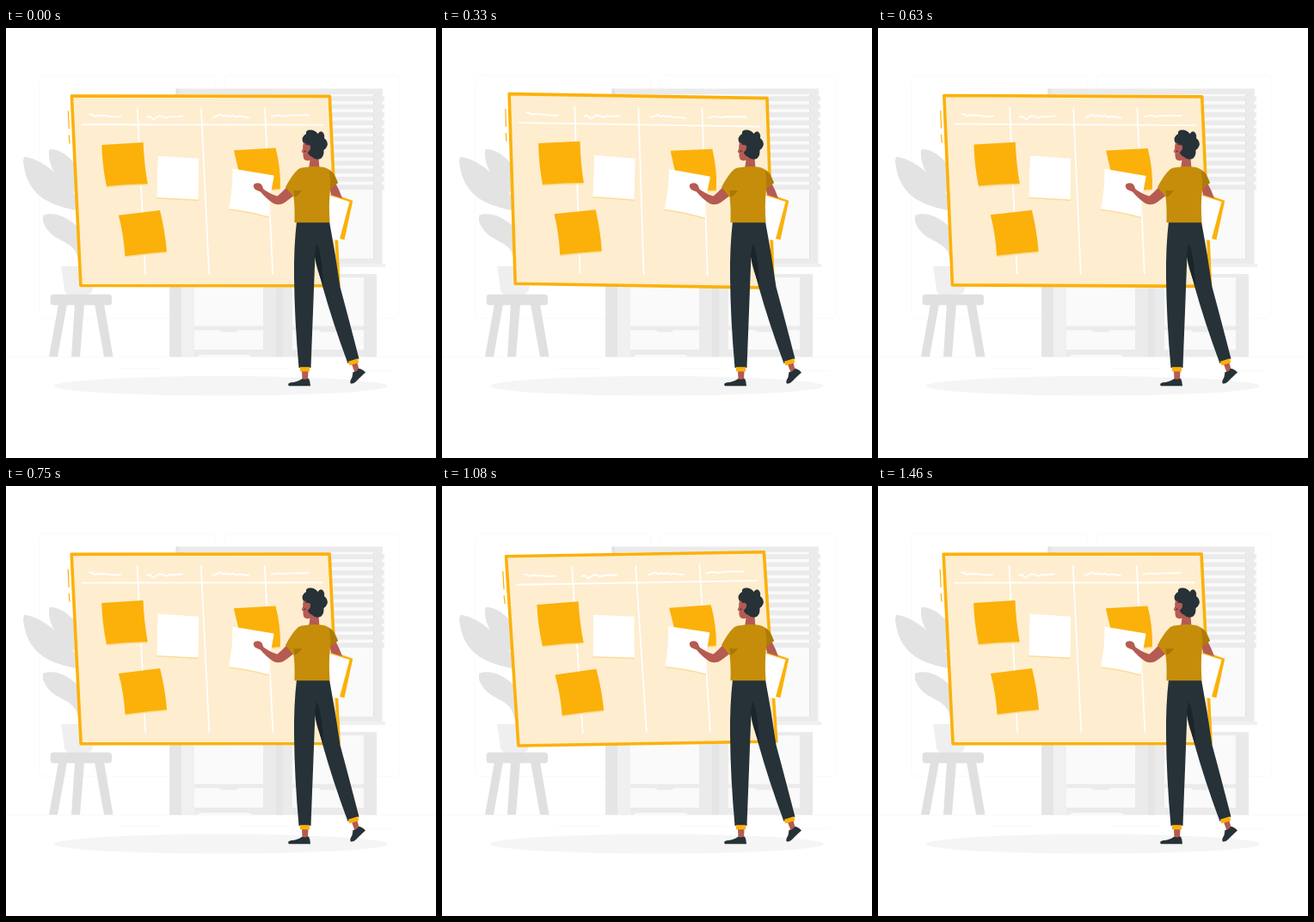
An HTML page with a canvas for the animation above (1.5 s loop, 500x500 px).

```html
<!DOCTYPE html>
<html lang="en">
<head>
<meta charset="utf-8">
<title>Planning board</title>
<style>
  html, body { margin: 0; width: 100%; height: 100%; overflow: hidden; background: #fff; }
  canvas { display: block; width: 500px; height: 500px; }
</style>
</head>
<body>
<canvas id="stage" width="500" height="500"></canvas>
<script>
const ctx = document.getElementById('stage').getContext('2d');
const LOOP = 1500, STEPS = 36;
const PIVOT = [231, 189];
const YELLOW = '#fbb10a', SHIRT = '#c58d09', SKIN = '#b55b52', DARK = '#263238';

function fill(d, color) {
  ctx.fillStyle = color;
  ctx.fill(new Path2D(d));
}

function line(d, color, width) {
  ctx.strokeStyle = color;
  ctx.lineWidth = width;
  ctx.stroke(new Path2D(d));
}

function box(x1, y1, x2, y2, color) {
  ctx.fillStyle = color;
  ctx.fillRect(x1, y1, x2 - x1, y2 - y1);
}

function rounded(x, y, w, h, r) {
  ctx.beginPath();
  ctx.roundRect(x, y, w, h, r);
}

function drawRoom() {
  box(0, 0, 500, 500, '#fff');
  ctx.strokeStyle = '#ebebeb';
  ctx.lineWidth = 0.3;
  for (const x of [38.8, 254]) {
    rounded(x, 55.2, 204, 282.4, 5.7);
    ctx.stroke();
  }
  box(0, 382.3, 500, 382.6, '#ebebeb');
  box(416.8, 398.5, 449.9, 398.8, '#ebebeb');
  box(131.5, 395.1, 183, 395.4, '#ebebeb');
  box(273, 395.1, 330, 395.4, '#ebebeb');
  ctx.fillStyle = '#f5f5f5';
  ctx.beginPath();
  ctx.ellipse(250, 416.2, 193.9, 11.3, 0, 0, Math.PI * 2);
  ctx.fill();
}

function drawWindow() {
  box(197.5, 70.5, 438, 274, '#ebebeb');
  box(197.5, 70.5, 201, 274, '#e3e3e3');
  box(208, 77, 427, 268, '#fafafa');
  box(427, 77, 428, 268, '#e1e1e1');
  box(436, 77, 438, 274, '#f0f0f0');
  box(195, 274, 441, 278, '#f0f0f0');
  ctx.fillStyle = '#ebebeb';
  for (let i = 0; i < 12; i++) {
    rounded(205, 79.3 + i * 9.36, 235, 5.7, 1);
    ctx.fill();
  }
}

function drawCabinet() {
  box(190, 286, 431, 382.3, '#ebebeb');
  box(190, 286, 204, 382.3, '#e5e5e5');
  box(204, 290, 219, 382.3, '#f0f0f0');
  box(314, 290, 322, 382.3, '#e5e5e5');
  box(416, 290, 431, 382.3, '#e9e9e9');
  for (const [left, right] of [[219, 299], [333, 416]]) {
    box(left, 290, right, 346.5, '#fafafa');
    box(left, 351.2, right, 374, '#fafafa');
    const mid = (left + right) / 2;
    fill(`M${mid - 12} 350H${mid + 12}L${mid + 8} 353.5H${mid - 8}Z`, '#ebebeb');
  }
  fill('M222 382.3Q224 380 228 380H280Q284 380 286 382.3Z', '#fafafa');
}

function drawPlant() {
  const leaf = '#e3e3e3';
  fill('M21 150C37 151 62 166 86 202V213C59 207 24 201 20 154Z', leaf);
  fill('M51 141C62 140 77 150 92 172V198C68 188 48 165 50 143Z', leaf);
  fill('M43 218C54 213 73 218 90 238V270H84C81 244 53 252 43 225Z', leaf);
  fill('M64 277H105L101 304Q99 310 94 310H75Q69 310 68 304Z', '#efefef');
  fill('M61 321H71L60 382.3H50Z M80 321H91L86 382.3H76Z M103 321H114L124.5 382.3H114Z', '#e0e0e0');
  rounded(51.7, 309.7, 71.3, 12.5, 3.5);
  ctx.fillStyle = '#e0e0e0';
  ctx.fill();
}

// A paper with a soft strip of shade under its lower edge.
function note(d, color) {
  ctx.save();
  ctx.translate(0, 1.5);
  fill(d, '#fbdc98');
  ctx.restore();
  fill(d, color);
}

function drawBoard(angle) {
  ctx.save();
  ctx.translate(...PIVOT);
  ctx.rotate(angle);
  ctx.translate(-PIVOT[0], -PIVOT[1]);

  const frame = 'M76.3 79.2H376.2L387 299.6H87Z';
  fill(frame, '#feedcf');
  line(frame, YELLOW, 3.6);

  line('M88.5 112.4H368', '#fff', 1.8);
  for (let i = 0; i < 3; i++) {
    const x = 152.7 + i * 74.1;
    line(`M${x} 93L${x + 9.4} 286`, '#fff', 1.8);
  }
  line('M97 100.5Q100 100 102 102.5Q105 103 108 101.5Q111 103 115 102Q123 104 133.5 103', '#fff', 1.9);
  line('M164 104Q167 102 169 104Q171 108 174 105Q178 101 182 103Q186 106 190 103Q197 103.5 205 102.5', '#fff', 1.9);
  line('M241 103.5Q247 102 250 100.5Q252 104 256 101.5Q260 104 264 101.5Q267 105 270 102.5L282 104', '#fff', 1.9);
  line('M309 103Q315 100.5 320 102Q324 103 328 101.5L352 101.3', '#fff', 1.9);

  line('M72.3 97L73.2 117', YELLOW, 1.2);
  line('M73.2 125L74 134', YELLOW, 1.2);

  note('M111.3 136L159.5 133Q160.5 158 164.7 181Q140 181.5 117 184Q112 160 111.3 136Z', YELLOW);
  note('M176.5 148.8L224.3 151.8L223.7 199.6Q200 198 175.3 197Z', '#fff');
  note('M131 217.8L179 212Q185 236 187 260Q162 262 138.5 265.3Q137 240 131 217.8Z', YELLOW);
  note('M265 142.3L313.5 139.5Q319.8 164 318.8 187L275 190Q271 165 265 142.3Z', YELLOW);
  note('M263.3 163.5L311.6 171.5Q306.5 195 306.3 219.5Q283 213 259 210.3Q263.5 188 263.3 163.5Z', '#fff');
  ctx.restore();
}

function drawPerson() {
  // Papers and far arm
  fill('M376 194L389 195.8L403.3 200.8L393.5 246.3L387.8 245Z', YELLOW);
  fill('M374 194L399.5 202L387.5 247L374 245Z', '#fff');
  fill('M376 184L383.5 181Q388 189 391 198L378 194Z', SKIN);

  // Ankles and shoes
  fill('M344 399H351.5L351 409H344.5Z M402 391L408.5 389L411 399L406 402Z', SKIN);
  fill('M344 408Q348 409 352 407.5Q354 411 354 416.2H329Q326.5 413.5 331 412.3Q340 411.5 344 408Z', DARK);
  fill('M403.5 400Q408 400 410 396Q414 396 418 400.5Q414 404 410 408Q405 414 401 413.5Q399 412 402.5 406Z', DARK);

  // Trousers
  fill('M338 225H376Q383 262 388.5 301Q399 340 410.5 384.5L397.5 390Q380 343 368 300Q362 278 359.5 263Q357 330 354.5 395H340.5Q335.5 340 335 290Q334.5 255 338 225Z', DARK);
  fill('M361 251Q367 258 369 300Q361 280 358.8 265Z', '#1b2529');
  line('M342 396.8H353', YELLOW, 5.2);
  line('M398.7 390.2L409.7 386.6', YELLOW, 5);

  // Neck and face
  fill('M354 150L363.5 151L364.5 164H352Z', SKIN);
  fill('M347 131Q344.5 137 345.3 140L343.7 144L345.5 145.5Q345 153.5 349 154Q355 155 360 151L362 132Z', SKIN);
  fill('M347 142.5Q349 142 348.5 144L347 144Z', DARK);
  fill('M346 134Q342 127 349 123Q348 118 355 118.5Q360 119 362.5 123Q366 118 369 122Q371 125 370 128Q375 132 373.5 137Q372 141 369.5 142Q370 149 366 152Q360 154 356 150Q350 147 351 143Q354 142 353.5 137Q351 135 349 136Q348 132 346 134Z', DARK);
  fill('M349.5 138.5Q352 134.8 354 137.5Q354.5 142 350.8 144.5Q348.5 142 349.5 138.5Z', SKIN);

  // Near arm and hand
  fill('M326 185.5L337.5 192.5Q331 198 324 203Q318 207 311 204Q302 198 296 190.5L290 188Q286.5 184.5 288.5 181.5Q294 178.5 297.5 182.5L299.5 187.5Q308 193.5 315.5 195.5Q321 191 326 185.5Z', SKIN);

  // Shirt
  fill('M348 162Q358 160 370 162Q379 165 382 171L386 180L377 187Q375 205 376.5 226.3H335.5Q336 208 334.5 196.5L325 185Q333 170 340 164Q343 162.2 348 162Z', SHIRT);
  fill('M334.5 189L344 189Q340 195 335.5 196.5Z', '#a87705');
  fill('M375.5 166Q381 168 382 171L386 180L377 187Q378 176 375.5 166Z', '#ad7c08');
}

// Linear sway in degrees: 0, 1 at a quarter, -1 at three quarters, back to 0.
function sway(phase) {
  if (phase < 0.25) return phase * 4;
  if (phase < 0.75) return 2 - phase * 4;
  return phase * 4 - 4;
}

function render(now) {
  const time = now % LOOP;
  const step = Math.floor((time + 5) * STEPS / LOOP) % STEPS;
  ctx.lineCap = ctx.lineJoin = 'round';
  drawRoom();
  drawWindow();
  drawCabinet();
  drawPlant();
  drawBoard(sway((step + 0.5) / STEPS) * Math.PI / 180);
  ctx.lineCap = 'butt';
  ctx.lineJoin = 'miter';
  drawPerson();
}

const start = performance.now();
function tick() {
  render(performance.now() - start);
  requestAnimationFrame(tick);
}
tick();
</script>
</body>
</html>
```
